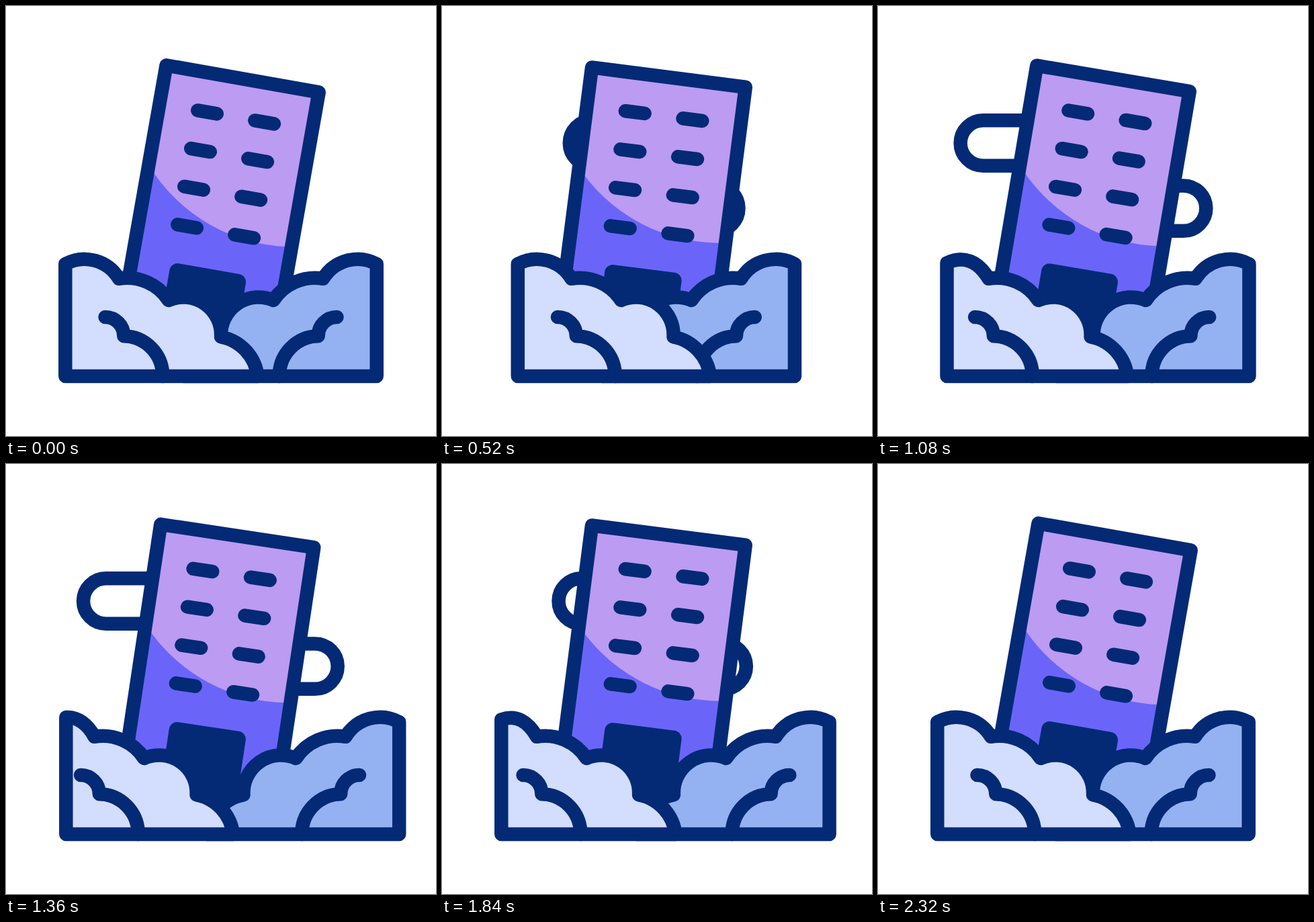
Animation, 640 px wide and 640 px high, one loop 2400 ms. Source, as an HTML page:

```html
<!DOCTYPE html>
<html lang="en">
<head>
<meta charset="utf-8">
<title>Collapsing building</title>
<style>
  html, body { margin: 0; width: 100%; height: 100%; overflow: hidden; background: #fff; }
  svg { display: block; width: 100%; height: 100%; }
  .ink { stroke: #042a75; stroke-width: 20.5; stroke-linecap: round; stroke-linejoin: round; fill: none; }
</style>
</head>
<body>
<svg viewBox="0 0 640 640">
  <rect width="640" height="640" fill="#fff"/>
  <path id="puffL" class="ink"/>
  <path id="puffR" class="ink"/>
  <g id="tower">
    <rect x="-115.3" y="-317.5" width="230.6" height="420" fill="#6a65f8"/>
    <path d="M-110 -317H110V-83A253 253 0 0 1 -110 -161Z" fill="#bc9bf2"/>
    <rect x="-115.3" y="-317.5" width="230.6" height="420" class="ink"/>
    <path id="windows" class="ink"/>
    <rect x="-57.6" y="-30.3" width="115.2" height="130" rx="12" fill="#042a75"/>
  </g>
  <g transform="translate(640) scale(-1 1)">
    <path id="cloudR" class="ink" style="fill:#94b2f2"/>
    <path id="curlR" class="ink"/>
  </g>
  <path id="cloudL" class="ink" style="fill:#d3ddfd"/>
  <path id="curlL" class="ink"/>
</svg>
<script>
const LOOP = 2400, STEP = 40;
const $ = id => document.getElementById(id);
const draw = (id, d) => $(id).setAttribute('d', d);
const mix = (a, b, p) => a + (b - a) * p;

const soft = x => x * x * (3 - 2 * x);

// cubic-bezier(.6, 0, .4, 1)
function strong(x) {
  let lo = 0, hi = 1;
  for (let i = 0; i < 24; i++) {
    const t = (lo + hi) / 2, u = 1 - t;
    if (1.8 * t * u * u + 1.2 * t * t * u + t * t * t < x) lo = t; else hi = t;
  }
  return soft(lo);
}

// keys: [time, value] pairs, time counted in steps
function track(keys, ease) {
  return f => {
    const i = keys.findIndex(k => k[0] > f);
    if (i < 0) return keys[keys.length - 1][1];
    if (i === 0) return keys[0][1];
    const [a, b] = [keys[i - 1], keys[i]];
    return mix(a[1], b[1], ease((f - a[0]) / (b[0] - a[0])));
  };
}

const sway = (a, b) => track([[0, 0], [16.6, a], [17, a], [37.8, b], [57.4, 0]], strong);
const shiftL = sway(26, -39);
const shiftR = sway(28.4, -36);
const edgeL = track([[0, 0], [16.6, 26], [17, 26], [37.8, 0]], strong);
const squash = track([[17, 0], [37.8, 1], [57.4, 0]], strong);
const puff = track([[0, 0], [32, 1], [34, 1], [58, 0]], soft);
const tilt = track([[0, 10], [13.6, 7.3], [21.2, 10], [45.7, 7.3], [56.4, 10]], soft);

// s: shift of the billows, e: shift of the outer wall, q: flattening of the first billow
function cloud(side, s, e, q) {
  const wall = 88.3 + e, top = mix(384, 376.5, q), cusp = 168 + s;
  draw('cloud' + side,
    `M${wall} 551V${top}` +
    `C${wall + mix(28, 16, q)} ${top - mix(15.3, 0, q)} ` +
    `${cusp - mix(16.5, 9.5, q)} ${405.8 - mix(27.2, 18, q)} ${cusp} 405.8` +
    `A74 74 0 0 1 ${242 + s} 438` +
    `A56 56 0 0 1 ${320 + s} 492.5` +
    `A67.5 67.5 0 0 1 ${374.5 + s} 551Z`);
  draw('curl' + side,
    `M${147.5 + s} 463A27.8 27.8 0 0 1 ${175.3 + s} 491.2A58.5 59.8 0 0 1 ${233.3 + s} 551`);
}

function bump(id, root, tip, top, sweep) {
  const r = 33.7, x = tip + (sweep ? -r : r);
  draw(id, `M${root} ${top}H${x}A${r} ${r} 0 0 ${sweep} ${x} ${top + 2 * r}H${root}`);
}

function render(ms) {
  const f = Math.floor(ms / STEP);
  const p = puff(f), q = squash(f), r = shiftR(f);
  bump('puffL', 300, 232 - 117 * p, 170.3, 0);
  bump('puffR', 340, 412 + 81.7 * p, 267.4, 1);
  $('tower').setAttribute('transform', `translate(297 421) rotate(${tilt(f)})`);
  cloud('L', shiftL(f), edgeL(f), q * q);
  cloud('R', r, r, 0);
}

let panes = '';
for (let row = 0; row < 4; row++)
  for (const x of [-43.2, 43.2]) panes += `M${x - 14.5} ${-259.5 + 57.5 * row}h29`;
draw('windows', panes);

function tick() {
  render(performance.now() % LOOP);
  requestAnimationFrame(tick);
}
tick();
</script>
</body>
</html>
```
